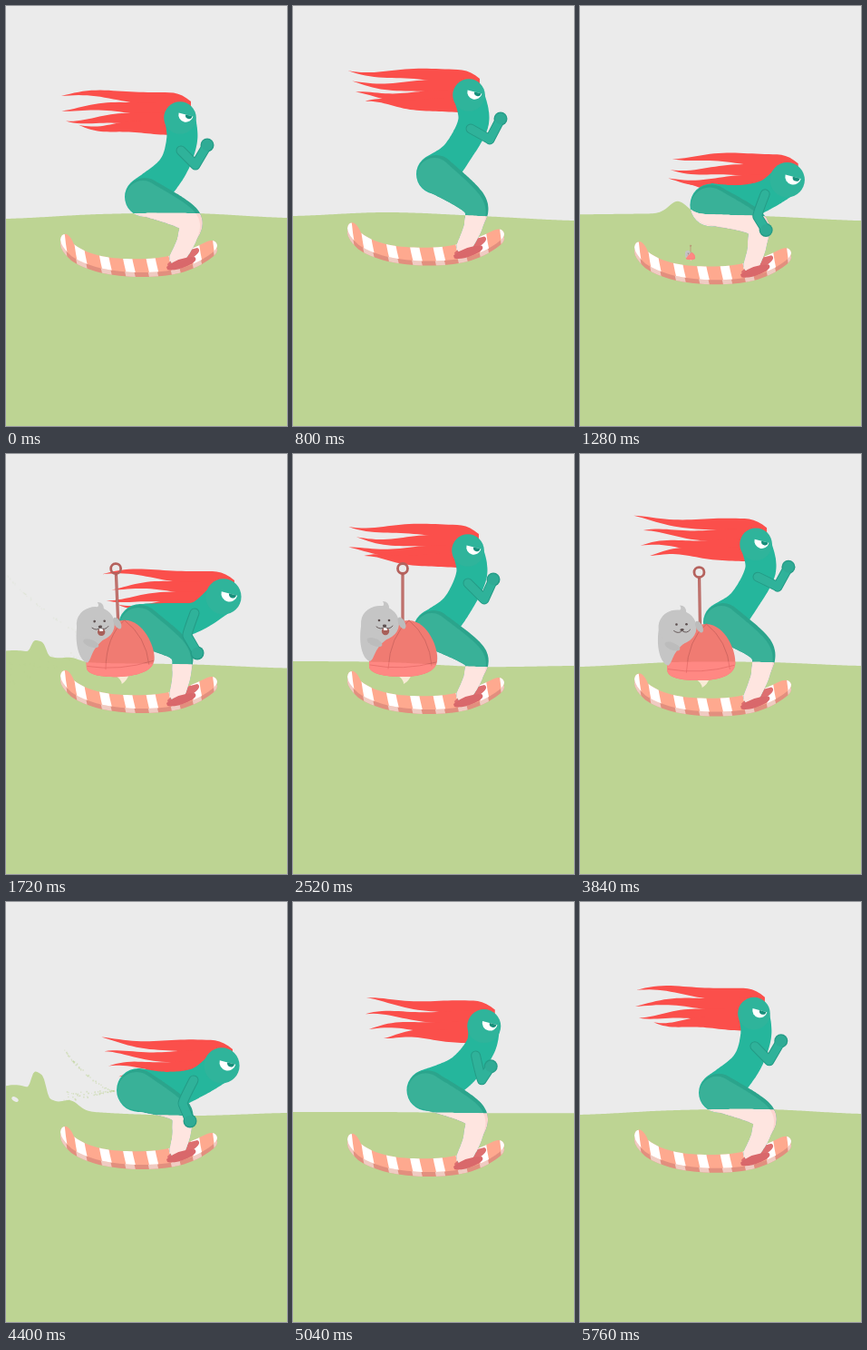
Write an HTML page with a canvas that moves like this. It is 310 px wide and 462 px high and loops after 5.8 s.

```html
<!DOCTYPE html>
<html lang="en">
<head>
<meta charset="utf-8">
<title>Bouncing rider</title>
<style>
  html, body { margin: 0; width: 100%; height: 100%; overflow: hidden; background: #ebebeb; }
  canvas { display: block; width: 310px; height: 462px; }
</style>
</head>
<body>
<canvas id="stage" width="310" height="462"></canvas>
<script>
const ctx = document.getElementById('stage').getContext('2d');
const LOOP = 5800, HALF = LOOP / 2;
const GRASS = '#bdd493';
const DRY = { body: '#25b69c', thigh: '#39b198', edge: '#2ba48c', bag: '#f07b72', seam: '#c9625d' };
const WET = { body: '#fee5e0', thigh: '#fee5e0', edge: '#fbd5cf', bag: '#ff8883', seam: '#e66d69' };

// time, then head, chest, waist and hip as x, y
const SPINE = [
  [0, 192, 123, 194, 148, 183, 179, 153, 210],
  [800, 194, 98, 199, 128, 180, 163, 158, 185],
  [940, 194, 99, 199, 128, 180, 163, 158, 185],
  [1320, 232, 198, 207, 213, 176, 221, 144, 221],
  [1500, 238, 180, 212, 198, 178, 208, 146, 207],
  [1720, 240, 157, 212, 178, 180, 185, 148, 189],
  [2120, 212, 138, 207, 161, 184, 188, 148, 207],
  [2520, 193, 106, 197, 133, 180, 168, 155, 193]
];
// time, then knee, shoulder, elbow and hand as x, y
const LIMBS = [
  [0, 200, 233, 193, 159, 209, 175, 222, 153],
  [800, 199, 216, 196, 135, 217, 147, 229, 124],
  [940, 199, 214, 196, 135, 218, 146, 230, 124],
  [1320, 192, 240, 205, 212, 194, 238, 203, 256],
  [1500, 190, 228, 207, 196, 195, 222, 203, 241],
  [1720, 190, 214, 208, 175, 200, 200, 211, 219],
  [2120, 198, 232, 202, 170, 208, 197, 218, 183],
  [2520, 199, 221, 193, 142, 211, 160, 221, 138]
];
const BOUNCE = [
  [0, 0], [700, -12.5], [940, -9.5], [1320, 9],
  [1500, -4], [1720, -13], [2120, 4], [2520, -12]
];
// time, then the height of the horizon at four even steps
const HORIZON = [
  [0, 234, 229, 228, 233], [800, 231, 227, 231, 236],
  [1720, 228, 230, 231.5, 235.5], [2520, 228, 229, 234, 233],
  [3840, 234, 229, 229, 233], [4400, 229, 232, 235, 232]
];
// time, then x, y and tilt
const BAG = [
  [0, 126, 250, 0], [1260, 122, 250, 0], [1480, 124, 224, -3], [1720, 125, 214, -2.5],
  [2120, 123, 224, 0], [2520, 121, 214, 0], [2900, 124, 225, 0],
  [3600, 131, 214, -1], [3840, 133, 218, -1], [4220, 128, 244, 2]
];

const clamp = v => Math.max(0, Math.min(1, v));
const bell = (x, mid, width) => Math.exp(-(((x - mid) / width) ** 2));
const noise = n => { const v = Math.sin(n * 127.1 + 3.7) * 43758.5; return v - Math.floor(v); };

function hermite(a, b, ma, mb, u) {
  const u2 = u * u, u3 = u2 * u;
  return a * (2 * u3 - 3 * u2 + 1) + ma * (u3 - 2 * u2 + u) + b * (3 * u2 - 2 * u3) + mb * (u3 - u2);
}

// smooth value of a repeating key track
function track(keys, time, period) {
  const n = keys.length;
  const key = i => keys[(i + n) % n];
  const at = i => key(i)[0] + Math.floor(i / n) * period;
  let i = n - 1;
  while (i > 0 && keys[i][0] > time) i--;
  const t0 = at(i), t1 = at(i + 1), span = t1 - t0;
  const slope = (j, c) => (key(j + 1)[c] - key(j - 1)[c]) / (at(j + 1) - at(j - 1)) * span;
  return keys[i].slice(1).map((v, k) => {
    const c = k + 1;
    return hermite(v, key(i + 1)[c], slope(i, c), slope(i + 1, c), (time - t0) / span);
  });
}

// smooth curve through points of any size, u from 0 to 1
function through(points, u) {
  const last = points.length - 1;
  const i = Math.min(last - 1, Math.floor(u * last));
  const p = j => points[Math.max(0, Math.min(last, j))];
  return p(i).map((v, c) => hermite(v, p(i + 1)[c],
    (p(i + 1)[c] - p(i - 1)[c]) / 2, (p(i + 2)[c] - v) / 2, u * last - i));
}

function disc(x, y, r, color) {
  ctx.fillStyle = color;
  ctx.beginPath();
  ctx.arc(x, y, Math.max(0, r), 0, 7);
  ctx.fill();
}

function oval(x, y, rx, ry, turn, color) {
  ctx.fillStyle = color;
  ctx.beginPath();
  ctx.ellipse(x, y, rx, ry, turn, 0, 7);
  ctx.fill();
}

function fill(d, color) {
  ctx.fillStyle = color;
  ctx.fill(new Path2D(d));
}

function line(d, color, width) {
  ctx.strokeStyle = color;
  ctx.lineWidth = width;
  ctx.lineCap = ctx.lineJoin = 'round';
  ctx.stroke(new Path2D(d));
}

// tapering limb through [x, y, radius] points
function tube(points, color) {
  ctx.fillStyle = color;
  ctx.beginPath();
  for (let k = 0; k <= 90; k++) {
    const [x, y, r] = through(points, k / 90);
    ctx.moveTo(x + r, y);
    ctx.arc(x, y, r, 0, 7);
  }
  ctx.fill();
}

function groundPath(time, phase) {
  const levels = track(HORIZON, time, LOOP).map(v => [v]);
  const rise = clamp((phase - 1300) / 160), fall = clamp((2050 - phase) / 500);
  const swell = 28 * rise * fall * fall, knob = 22 * rise * fall;
  const burst = 20 * bell(phase, 1330, 80);
  const path = new Path2D();
  path.moveTo(0, 462);
  for (let x = 0; x <= 310; x += 2) {
    const y = through(levels, x / 310)[0]
      - swell * bell(x, 10, 45)
      - knob * Math.exp(-(((x - 36) / 9) ** 4))
      - swell * 0.3 * bell(x, 72, 12)
      - burst * bell(x, 108, 14);
    path.lineTo(x, y);
  }
  path.lineTo(310, 462);
  path.closePath();
  return path;
}

function drawSpray(phase) {
  const age = phase - 1320;
  if (age < 0 || age > 480) return;
  const reach = age / 180;
  ctx.globalAlpha = 0.7 * (1 - age / 480);
  for (let i = 0; i < 110; i++) {
    const f = noise(i), low = i % 2;
    const x = 118 - f * 56 * reach + noise(i + 200) * 3;
    const y = 208 - (low ? -14 * noise(i + 400) * f : 46 * f ** 1.5) * reach + 18 * (reach - 1) * f;
    disc(x, y, 0.5 + 0.5 * noise(i + 600), GRASS);
  }
  ctx.globalAlpha = 1;
  if (age > 120 && age < 260) oval(10, 217, 4, 2.3, 0.5, '#ebebeb');
}

const boardShape = new Path2D('M60 257Q61 250 67 251Q72 254 75 262C95 278 130 279 155 278' +
  'C185 277 205 267 222 259Q231 256 233 263Q233 267 228 271C205 289 180 293 150 293' +
  'C115 293 88 286 72 275Q60 264 60 257Z');

function boardLayer(shift, base, stripe) {
  ctx.save();
  ctx.translate(0, shift);
  ctx.clip(boardShape);
  ctx.fillStyle = base;
  ctx.fillRect(50, 240, 200, 70);
  for (let i = 0; i < 8; i++) {
    const x = i ? 54 + i * 25.5 : 60;
    line(`M${x} 253Q${x + 2} 275 ${x + 9} 300`, stripe, 10);
  }
  ctx.restore();
}

function drawBoard() {
  boardLayer(5, '#e28f7e', '#f0cbc2');
  boardLayer(0, '#fea98f', '#ffffff');
}

function drawHair(hx, hy, time) {
  const roots = [-19, -9, 2, 11], tips = [-27, -12, 1, 9], reach = [143, 139, 141, 125];
  const turn = time / LOOP * Math.PI * 2;
  ctx.fillStyle = '#fb4f4b';
  for (let s = 0; s < 4; s++) {
    const start = hx + [12, 6, -2, -8][s];
    const length = reach[s] - 12 + start - hx + 4 * Math.sin(turn * 8 + s * 2);
    const top = [], bottom = [];
    for (let k = 0; k <= 30; k++) {
      const u = k / 30;
      const wave = 4.5 * u * u * Math.sin(u * 7 + turn * 10 + s * 0.9);
      const dip = s ? 0 : 9 * Math.max(0, 1 - u / 0.16) ** 2;
      const y = hy + roots[s] + (tips[s] - roots[s]) * u + wave + dip;
      const half = 8 * (1 - u ** 1.7);
      top.push([start - u * length, y - half]);
      bottom.unshift([start - u * length, y + half]);
    }
    ctx.beginPath();
    top.concat(bottom).forEach(p => ctx.lineTo(...p));
    ctx.fill();
  }
}

function drawBody(pose, ink) {
  tube(pose.spine, ink.body);
  tube(pose.leg, ink.edge);
  tube(pose.leg.map(([x, y, r], i) => [x - (i < 2 ? 2 : 0), y + (i < 2 ? 1 : 0), r - (i < 2 ? 2 : 0)]), ink.thigh);
}

function drawFace([x, y, r]) {
  disc(x, y, r, '#2fb49b');
  const size = r * 0.46;
  ctx.save();
  ctx.translate(x + 6.5, y - 3.5);
  ctx.rotate(0.25);
  ctx.beginPath();
  ctx.arc(0, 0, size, 0, Math.PI);
  ctx.closePath();
  ctx.fillStyle = '#fff';
  ctx.fill();
  ctx.clip();
  disc(size * 0.42, 0, size * 0.46, '#178f7b');
  ctx.restore();
}

function drawArm([sx, sy, ex, ey, hx, hy]) {
  const d = `M${sx} ${sy}Q${ex - 1} ${ey - 1} ${ex} ${ey}L${hx} ${hy}`;
  line(d, '#249b86', 11);
  disc(hx, hy, 7.5, '#249b86');
  line(d, '#2fb29a', 9);
  disc(hx, hy, 6.2, '#2fab95');
}

const dome = 'M-37 20C-38-10-25-30 7-31C28-30 40 0 38 14C36 28 15 31 0 31C-20 31-36 28-37 20Z';

function drawDome(ink) {
  fill(dome, ink.bag);
  line('M7-31Q-14-14-16 22M7-31Q30-12 32 19M-36 18Q0 25 37 15', ink.seam, 0.8);
}

function drawSeal(laughing) {
  const fur = '#c5c5c5', dark = '#5d5050';
  fill('M-45-30C-50-6-44 12-36 14C-30 11-33 0-15-12Z', fur);
  fill('M-28-45Q-18-46-22-52Q-15-52-15-44Z', fur);
  oval(-25, -28, 21, 19, 0.1, fur);
  oval(-1, -28, 7, 3.5, 1.1, '#bcbcbc');
  oval(-31, -7, 9, 4, 0.4, '#bcbcbc');
  disc(-26, -31, 1.3, dark);
  disc(-15, -31, 1.3, dark);
  if (laughing) {
    disc(-19, -19, 4.2, '#a8605a');
    ctx.fillStyle = '#fff';
    ctx.fillRect(-21, -23, 4, 3);
  }
  line('M-29-24Q-24-20-20-24Q-15-20-11-25', dark, 0.9);
  oval(-20, -25, 2.2, 1.4, 0, dark);
}

function drawBag(time, ground) {
  const grow = clamp((time - 1260) / 160) * clamp((4330 - time) / 130);
  if (!grow) return;
  const [x, y, tilt] = track(BAG, time, LOOP);
  const place = () => {
    ctx.translate(x, y + 30 * (1 - grow));
    ctx.rotate(tilt * Math.PI / 180);
    ctx.scale(grow, grow);
  };
  ctx.save();
  place();
  fill('M-5 28L10 28Q7 36 1 39Q1 34-5 30Z', '#f8ebd6');
  line('M0-82V-28', '#b5625d', 3.2);
  line('M0-80V-28', '#d08a84', 0.8);
  line('M5.5-88A5.5 5.5 0 1 1-5.5-88A5.5 5.5 0 1 1 5.5-88', '#b5625d', 2.8);
  drawDome(DRY);
  ctx.restore();

  ctx.save();
  ctx.clip(ground);
  place();
  drawDome(WET);
  ctx.restore();

  ctx.save();
  place();
  drawSeal(time < 3300);
  ctx.restore();
}

function makePose(phase, lift) {
  const [hx, hy, cx, cy, wx, wy, bx, by] = track(SPINE, phase, HALF);
  const limbs = track(LIMBS, phase, HALF);
  const [kx, ky] = limbs;
  const lean = clamp((hx - 194) / 44);
  const hip = 22 + 2 * lean;
  return {
    head: [hx, hy, 17.8 + 1.8 * lean],
    spine: [[hx, hy, 17 + lean], [cx, cy, 17 - lean], [wx, wy, 16.5 + 4.5 * lean], [bx, by, hip]],
    leg: [[bx, by, hip - 1], [kx, ky, 14.5 - lean], [kx * 0.6 + 80, ky * 0.5 + 138 + lift / 2, 10.5], [189, 277 + lift, 8.5]],
    arm: limbs.slice(2)
  };
}

function draw(time) {
  const phase = time % HALF;
  const lift = track(BOUNCE, phase, HALF)[0];
  const pose = makePose(phase, lift);
  const ground = groundPath(time, phase);

  ctx.fillStyle = '#ebebeb';
  ctx.fillRect(0, 0, 310, 462);
  ctx.fillStyle = GRASS;
  ctx.fill(ground);
  drawSpray(phase);

  ctx.save();
  ctx.translate(0, lift);
  drawBoard();
  fill('M178 284Q190 270 211 266Q217 269 206 277Q192 290 180 290Z', '#dd6f70');
  ctx.restore();

  drawHair(pose.head[0], pose.head[1], time);
  drawBody(pose, DRY);
  ctx.save();
  ctx.clip(ground);
  drawBody(pose, WET);
  ctx.restore();

  ctx.save();
  ctx.translate(0, lift);
  fill('M177 287Q190 276 208 276Q213 280 200 286Q186 292 178 290Z', '#d9686b');
  ctx.restore();

  drawFace(pose.head);
  drawArm(pose.arm);
  drawBag(time, ground);
}

const began = performance.now();
function tick() {
  draw((performance.now() - began) % LOOP);
  requestAnimationFrame(tick);
}
tick();
</script>
</body>
</html>
```
